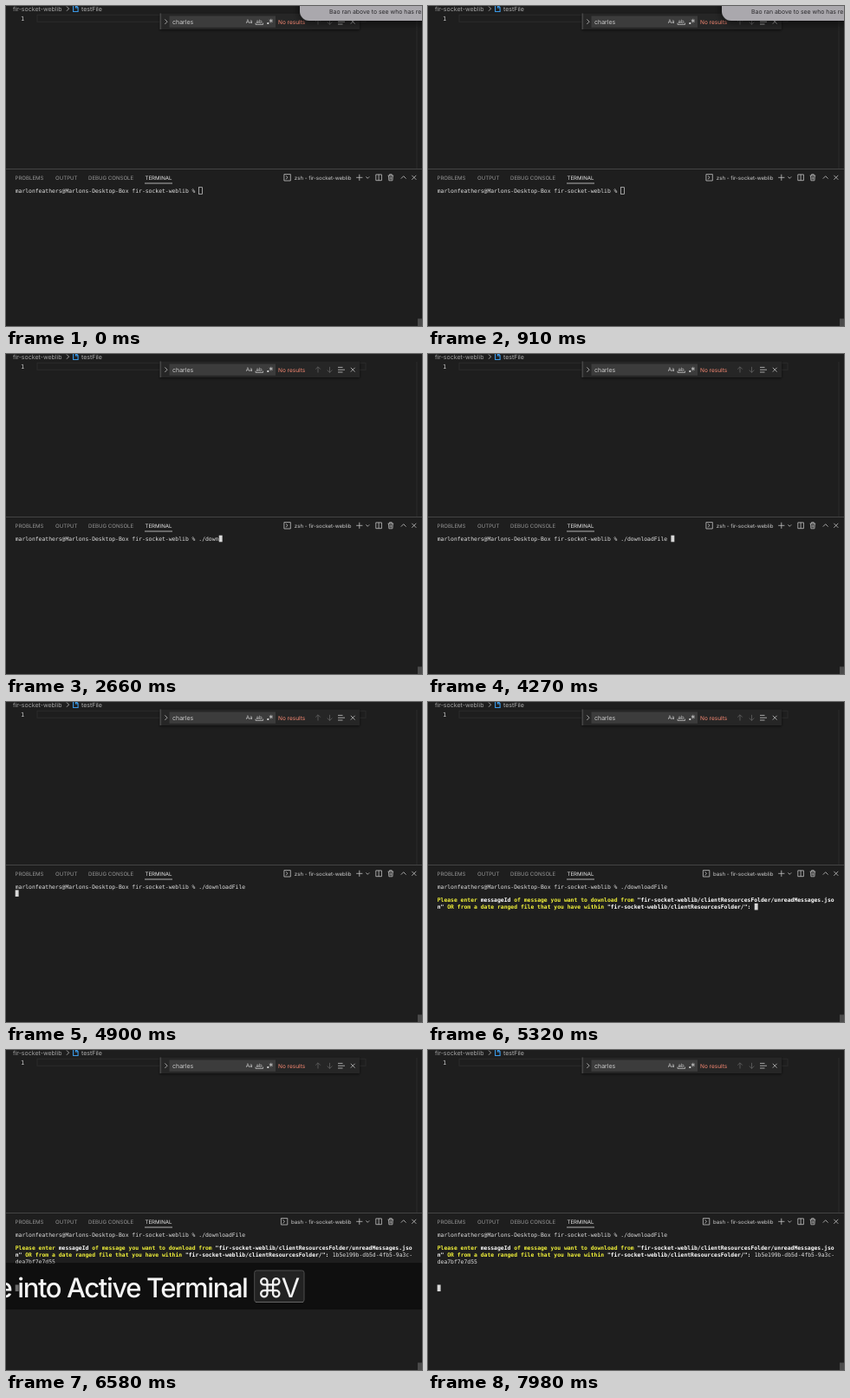
Animation, 480 px wide and 370 px high, one loop 8 s. Source, as an HTML page:

```html
<!DOCTYPE html>
<html lang="en">
<head>
<meta charset="utf-8">
<title>Editor and terminal</title>
<style>
  html, body { margin: 0; width: 100%; height: 100%; overflow: hidden; background: #1e1e1e; }
  svg { display: block; width: 480px; height: 370px; }
  text { font: 7px Inter, "Open Sans", sans-serif; fill: #ccc; white-space: pre; text-rendering: geometricPrecision; }
  .icon { fill: none; stroke: #c5c5c5; stroke-width: .8; }
  .tabs text { font-size: 6.1px; fill: #969696; }
  .term text { font: 6.4px "DejaVu Sans Mono", monospace; fill: #e2e2e2; }
  .term .bold { font-weight: 700; fill: #fff; }
  .term .bold tspan { fill: #f3f33a; }
  .overlay text { font-size: 31px; fill: #f4f4f4; }
</style>
</head>
<body>
<svg viewBox="0 0 480 370">
  <defs>
    <filter id="shade" x="-30%" y="-100%" width="160%" height="300%">
      <feDropShadow dx="0" dy="3" stdDeviation="5" flood-opacity=".55"/>
    </filter>
    <filter id="soft" x="-10%" y="-50%" width="120%" height="200%">
      <feDropShadow dx="0" dy="1" stdDeviation="1.5" flood-opacity=".6"/>
    </filter>
  </defs>

  <!-- editor -->
  <text x="8" y="5.5" style="fill:#a5a5a5">fir-socket-weblib</text>
  <path class="icon" d="M70 .5l2.6 2.6L70 5.7"/>
  <path class="icon" d="M77.6 -1v7.5h5.5V1.8L80.6 -1M80.4 -1v3h2.7" style="stroke:#3b9ae8;stroke-width:1.1"/>
  <text x="87" y="5.5" style="fill:#b0b0b0">testFile</text>
  <text x="17" y="16.6" style="font:7px 'DejaVu Sans Mono',monospace;fill:#c6c6c6">1</text>
  <rect x="36" y="10.3" width="379" height="8" fill="none" stroke="#2b2b2b"/>
  <path d="M474 9V188" stroke="#2b2b2b"/>

  <!-- find box -->
  <rect x="177.5" y="8.5" width="230.5" height="18.5" fill="#252526" filter="url(#soft)"/>
  <path d="M178.3 8.5V27" stroke="#454545" stroke-width="1.6"/>
  <rect x="188.5" y="11.5" width="122.5" height="13.3" fill="#3c3c3c"/>
  <path class="icon" d="M183.3 15.4l2.8 2.8-2.8 2.8"/>
  <text x="192" y="20.6">charles</text>
  <text x="276.8" y="20.4" style="font-size:6.2px">Aa</text>
  <text x="288.6" y="19.6" style="font-size:6px">ab</text>
  <path class="icon" d="M288 19.6v1.8h8.5v-1.8"/>
  <rect x="301.3" y="19" width="2" height="2" fill="#ccc"/>
  <path class="icon" d="M305.8 14.8v4.6M303.8 16l4 2.3M307.8 16l-4 2.3"/>
  <text x="314" y="20.5" style="font-size:6.5px;fill:#f48771">No results</text>
  <path class="icon" d="M360 21.5v-6.6M357.2 17.6l2.8-2.8 2.8 2.8M373.5 14.8v6.6M370.7 18.6l2.8 2.8 2.8-2.8" style="stroke:#626262"/>
  <path class="icon" d="M383 15.4h5.5M383 18.2h8M383 21h5.5M397.8 15.8l4.8 4.8M402.6 15.8l-4.8 4.8"/>

  <!-- panel header -->
  <path d="M0 188.5H480" stroke="#444"/>
  <g class="tabs">
    <text x="10.5" y="200.7">PROBLEMS</text>
    <text x="57" y="200.7">OUTPUT</text>
    <text x="95" y="200.7">DEBUG CONSOLE</text>
    <text x="160.5" y="200.7" style="fill:#e7e7e7">TERMINAL</text>
    <text id="shell" x="398.5" y="200.7" text-anchor="end" style="fill:#ccc"></text>
  </g>
  <path d="M160 205H192" stroke="#d8d8d8" stroke-width=".8"/>
  <path id="shellIcon" class="icon" d="M320.9 194.6h7.4v7.4h-7.4zM322.9 196.3l2.2 2-2.2 2"/>
  <path class="icon" d="M404.2 198.3h7.2M407.8 194.7v7.2M415.4 197.4l1.9 1.9 1.9-1.9M426.8 194.9h6.6v6.8h-6.6zM430.1 194.9v6.8M440.6 196.1h6.6M442.6 196v-1.3h2.6v1.3M441.5 196.2l.4 5.6h4l.4-5.6M443.1 197.5v3M444.7 197.5v3M455.8 199.6l2.9-2.9 2.9 2.9M468.3 195.8l5 5M473.3 195.8l-5 5"/>
  <rect x="475" y="361.5" width="5" height="9" fill="#4b4b4b"/>

  <!-- terminal -->
  <g class="term">
    <text id="prompt" x="10.7" y="215.8"></text>
    <g id="question">
      <text class="bold" x="10.7" y="231.2"><tspan>Please enter </tspan>messageId<tspan> of message you want to download from </tspan>"fir-socket-weblib/clientResourcesFolder/unreadMessages.jso</text>
      <text class="bold" x="10.7" y="238.9">n"<tspan> OR from a date ranged file that you have within </tspan>"fir-socket-weblib/clientResourcesFolder/":</text>
    </g>
    <g id="answer">
      <text x="376.7" y="238.9">1b5e199b-db5d-4fb5-9a3c-</text>
      <text x="10.7" y="246.6">dea7bf7e7d55</text>
    </g>
    <rect id="cursor" width="3.9" height="7.6" stroke-width=".7"/>
  </g>

  <!-- shortcut overlay -->
  <g id="overlay" class="overlay">
    <rect y="246" width="480" height="54" fill="#000" fill-opacity=".5"/>
    <text x="278.5" y="285.5" text-anchor="end" style="font-weight:500;letter-spacing:-1.4px">Paste into Active Terminal</text>
    <rect x="286.7" y="255" width="57.3" height="36.5" rx="2.5" fill="#808080" fill-opacity=".17" stroke="#4c4c4c"/>
    <path d="M288 291.5H343" stroke="#666"/>
    <text x="304.8" y="285.5" text-anchor="middle">⌘</text>
    <text x="328.5" y="285.5" text-anchor="middle">V</text>
  </g>

  <!-- notification -->
  <g id="note">
    <rect x="339" y="-40" width="190" height="57" rx="11" fill="#aaa8ad" filter="url(#shade)"/>
    <text x="373" y="8.6" style="font-size:6.9px;fill:#29282b">Bao ran above to see who has read</text>
  </g>
</svg>
<script>
const $ = id => document.getElementById(id);
const LOOP = 8000, CHAR = 3.853, LINE = 7.72;
const PROMPT = "marlonfeathers@Marlons-Desktop-Box fir-socket-weblib % ";
const COMMAND = "./downloadFile ";
const FOCUS = 980, ENTER = 4830, ASK = 4970, PASTE = 6160, SEND = 6440;

// [time, number of command characters on screen]
const keys = [[0, 0], [1820, 1], [2100, 2], [2240, 3], [2380, 4], [2520, 5], [2660, 6],
  [2800, 7], [2940, 8], [3080, 9], [3220, 10], [3780, 11], [3990, 15]];

const show = (id, on) => $(id).style.display = on ? "" : "none";

function cursorCell(t, typed) {
  if (t < ENTER) return [PROMPT.length + typed, 0];
  if (t < ASK) return [0, 1];
  if (t < PASTE) return [95, 3];
  return t < SEND ? [12, 4] : [0, 8];
}

function draw(t) {
  const typed = keys.findLast(k => k[0] <= t)[1];
  const [col, row] = cursorCell(t, typed);
  const focused = t >= FOCUS;
  const asked = t >= ASK;

  $("prompt").textContent = PROMPT + COMMAND.slice(0, typed);
  $("cursor").setAttribute("x", 10.7 + col * CHAR);
  $("cursor").setAttribute("y", 209.7 + row * LINE);
  $("cursor").setAttribute("fill", focused ? "#d8d8d8" : "none");
  $("cursor").setAttribute("stroke", focused ? "none" : "#d8d8d8");

  $("shell").textContent = (asked ? "bash" : "zsh") + " - fir-socket-weblib";
  $("shellIcon").setAttribute("transform", `translate(${asked ? -3.5 : 0})`);
  show("question", asked);
  show("answer", t >= PASTE);
  show("overlay", t >= 6090 && t < 6930);

  const out = Math.min(1, Math.max(0, (t - 1900) / 240));
  $("note").setAttribute("transform", `translate(${170 * out * out})`);
  show("note", out < 1);
}

function tick() {
  draw(performance.now() % LOOP);
  requestAnimationFrame(tick);
}
tick();
</script>
</body>
</html>
```
